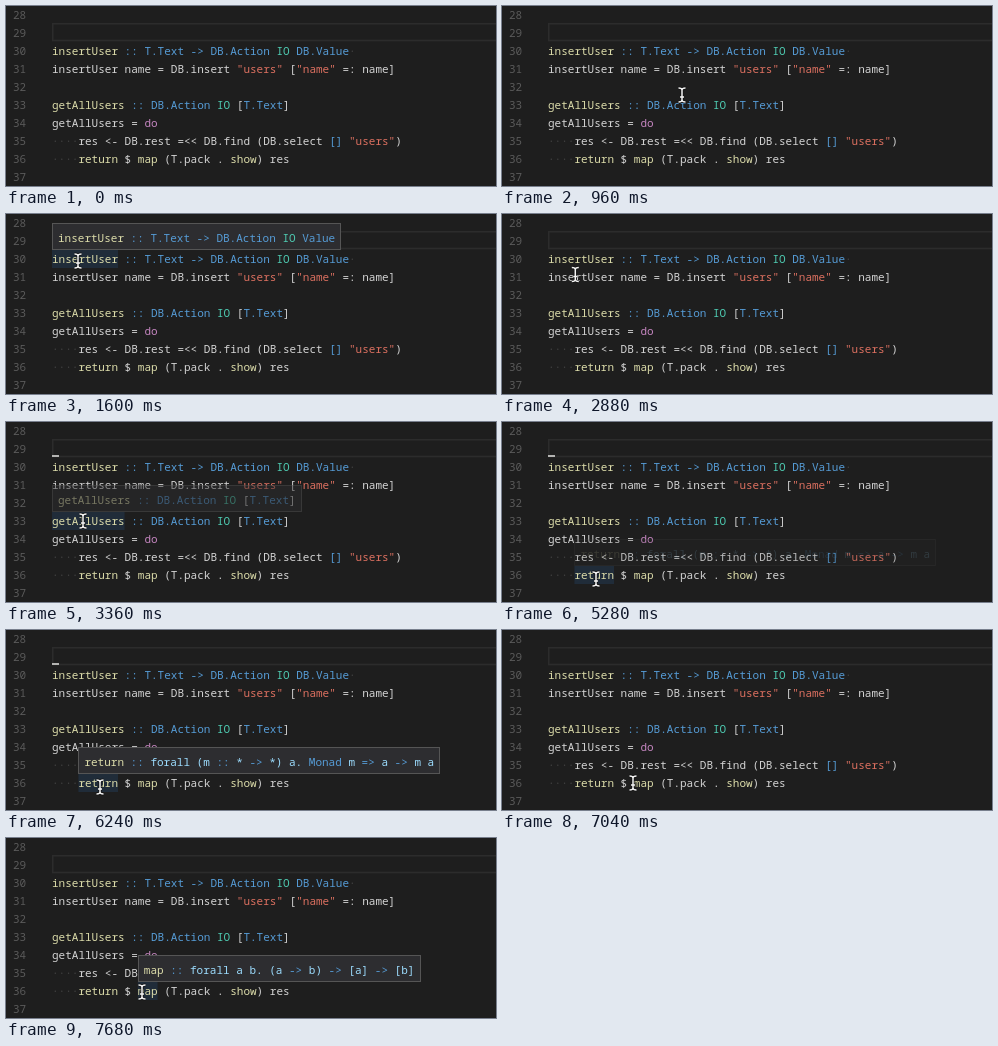
These frames come from a looping animation (490 by 180 pixels, 8000 ms). An HTML page with a canvas:

```html
<!DOCTYPE html>
<html lang="en">
<head>
<meta charset="utf-8">
<title>Type hints on hover</title>
<style>
html, body { margin: 0; width: 100%; height: 100%; overflow: hidden; background: #1e1e1e; }
canvas { display: block; width: 490px; height: 180px; }
</style>
</head>
<body>
<canvas id="stage"></canvas>
<script>
const W = 490, H = 180, LOOP = 8000, STEP = 160, BLINK = 480;
const CHAR = 6.6, LEFT = 46, ROW = 18, FIRST = 28;
const canvas = document.getElementById('stage');
const ctx = canvas.getContext('2d');
const ratio = window.devicePixelRatio || 1;
canvas.width = W * ratio;
canvas.height = H * ratio;

const COLORS = {
  w: '#d4d4d4', y: '#dcdcaa', b: '#569cd6', t: '#4ec9b0',
  s: '#dc7060', p: '#c586c0', v: '#9cdcfe', d: '#424242', n: '#5a5a5a'
};

// Each line alternates colour keys and text.
const CODE = {
  30: ['y', 'insertUser', 'b', ' :: T.Text -> DB.Action ', 't', 'IO', 'b', ' DB.Value', 'd', '·'],
  31: ['w', 'insertUser name = DB.insert ', 's', '"users"', 'w', ' [', 's', '"name"', 'w', ' =: name]'],
  33: ['y', 'getAllUsers', 'b', ' :: DB.Action ', 't', 'IO', 'w', ' [', 'b', 'T.Text', 'w', ']'],
  34: ['w', 'getAllUsers = ', 'p', 'do'],
  35: ['d', '····', 'w', 'res <- DB.rest =<< DB.find (DB.select ', 'b', '[]', 's', ' "users"', 'w', ')'],
  36: ['d', '····', 'y', 'return', 'w', ' $ ', 'y', 'map', 'w', ' (T.pack . ', 'y', 'show', 'w', ') res']
};

// fade is the partial opacity of the step that precedes the full tooltip.
const HOVERS = [
  { row: 30, col: 0, len: 10, from: 1440, to: 2880, fade: 0.5,
    text: ['y', 'insertUser', 'b', ' :: T.Text -> DB.Action ', 't', 'IO', 'b', ' Value'] },
  { row: 33, col: 0, len: 11, from: 3360, to: 4800, fade: 0.45,
    text: CODE[33] },
  { row: 36, col: 4, len: 6, from: 5280, to: 6720, fade: 0.14,
    text: ['y', 'return', 'b', ' :: ', 'v', 'forall (m ', 'b', '::', 'v', ' * ', 'b', '->', 'v', ' *) a. ',
           'b', 'Monad', 'v', ' m ', 'b', '=>', 'v', ' a ', 'b', '->', 'v', ' m a'] },
  { row: 36, col: 13, len: 3, from: 7520, to: LOOP, fade: 0.5,
    text: ['y', 'map', 'b', ' :: ', 'v', 'forall a b. (a ', 'b', '->', 'v', ' b) ', 'b', '->',
           'v', ' [a] ', 'b', '->', 'v', ' [b]'] }
];

// Pointer stops: time, x, y.
const PATH = [
  [160, 292, 134], [480, 288, 131], [640, 288, 131], [1280, 72, 47],
  [2720, 72, 47], [3200, 77, 99], [4640, 77, 99], [5120, 93, 159],
  [5280, 94, 157], [6560, 94, 157], [7040, 131, 153], [7200, 136, 154], [LOOP, 136, 154]
];

const rowTop = row => (row - FIRST) * ROW;
const rowBase = row => rowTop(row) + 13;
const colX = col => LEFT + col * CHAR;

function drawText(parts, x, y) {
  for (let i = 0; i < parts.length; i += 2) {
    ctx.fillStyle = COLORS[parts[i]];
    ctx.fillText(parts[i + 1], x, y);
    x += parts[i + 1].length * CHAR;
  }
}

function textWidth(parts) {
  return parts.reduce((sum, part, i) => sum + (i % 2 ? part.length * CHAR : 0), 0);
}

function drawEditor(caretOn) {
  ctx.strokeStyle = '#2c2c2c';
  ctx.lineWidth = 1.5;
  ctx.strokeRect(LEFT + 0.75, 17.75, W, 16.75);
  for (let row = FIRST; row <= 37; row++) {
    drawText(['n', String(row)], 7, rowBase(row));
    if (CODE[row]) drawText(CODE[row], LEFT, rowBase(row));
  }
  if (caretOn) {
    ctx.fillStyle = '#b4b4b2';
    ctx.fillRect(LEFT, 33, 7, 2);
  }
}

function drawTooltip(hover, alpha) {
  const x = colX(hover.col), y = rowTop(hover.row) - 27;
  ctx.globalAlpha = alpha;
  ctx.fillStyle = '#2d2d30';
  ctx.strokeStyle = '#555555';
  ctx.lineWidth = 1;
  const box = [Math.round(x) + 0.5, y + 0.5, Math.round(textWidth(hover.text) + 12) - 1, 26];
  ctx.fillRect(...box);
  ctx.strokeRect(...box);
  drawText(hover.text, x + 6, y + 19);
  ctx.globalAlpha = 1;
}

function pointerAt(t) {
  const i = PATH.findIndex(stop => stop[0] > t);
  if (i < 1) return null;
  const [t0, x0, y0] = PATH[i - 1], [t1, x1, y1] = PATH[i];
  const u = (t - t0) / (t1 - t0), k = u * u * (3 - 2 * u);
  return [x0 + (x1 - x0) * k, y0 + (y1 - y0) * k];
}

function drawPointer([x, y]) {
  ctx.beginPath();
  for (const side of [-1, 1]) {
    ctx.moveTo(x + side * 3.5, y - 7);
    ctx.quadraticCurveTo(x, y - 7, x, y - 5);
    ctx.lineTo(x, y + 5);
    ctx.quadraticCurveTo(x, y + 7, x + side * 3.5, y + 7);
  }
  ctx.moveTo(x - 2, y + 2);
  ctx.lineTo(x + 2, y + 2);
  for (const [color, width] of [['#111111', 3], ['#f4f4f4', 1.5]]) {
    ctx.strokeStyle = color;
    ctx.lineWidth = width;
    ctx.stroke();
  }
}

function draw(t) {
  ctx.setTransform(ratio, 0, 0, ratio, 0, 0);
  ctx.font = '11px "Noto Sans Mono", "DejaVu Sans Mono", monospace';
  ctx.fillStyle = '#1e1e1e';
  ctx.fillRect(0, 0, W, H);
  const hover = HOVERS.find(h => t >= h.from && t < h.to);
  if (hover) {
    ctx.fillStyle = '#202c39';
    ctx.fillRect(colX(hover.col), rowTop(hover.row), hover.len * CHAR, ROW);
  }
  drawEditor(Math.floor(t / BLINK) % 2 === 1);
  if (hover) drawTooltip(hover, t < hover.from + STEP ? hover.fade : 1);
  const pointer = pointerAt(t);
  if (pointer) drawPointer(pointer);
}

const start = performance.now();
function tick() {
  const t = (performance.now() - start) % LOOP;
  draw(Math.floor(t / STEP) * STEP);
  requestAnimationFrame(tick);
}
tick();
</script>
</body>
</html>
```
